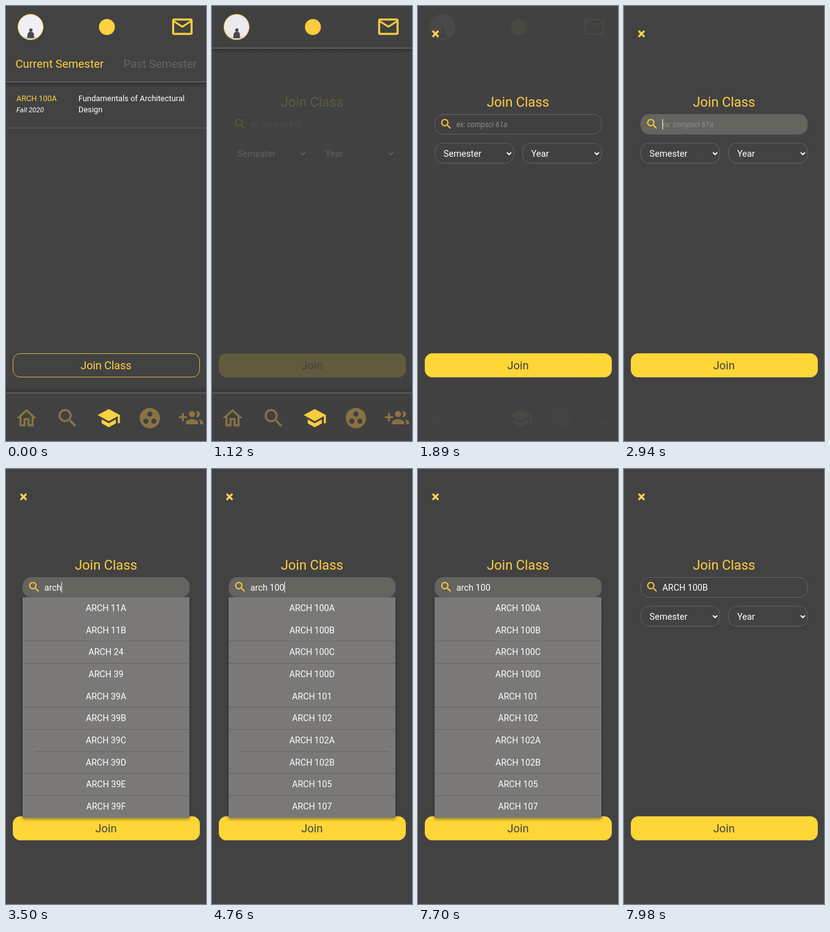
An HTML page for the animation above (8 s loop, 326 px wide and 704 px high).

```html
<!DOCTYPE html>
<html lang="en">
<head>
<meta charset="utf-8">
<title>Join Class</title>
<style>
  html, body { margin: 0; width: 100%; height: 100%; overflow: hidden; background: #424242; }
  svg { display: block; width: 100vw; height: 100vh; }
  text { font-family: Roboto, "Open Sans", sans-serif; fill: #fff; white-space: pre; }
  .gold { fill: #ffd03f; }
  .button { fill: #fed636; }
  .dim { fill: #8a7444; }
  .mid { text-anchor: middle; }
  .it { font-style: italic; }
  .bg { fill: #424242; }
  .box { fill: none; stroke: #636363; }
</style>
</head>
<body>
<svg viewBox="0 0 326 704">
  <defs>
    <linearGradient id="down" x1="0" y1="0" x2="0" y2="1">
      <stop offset="0" stop-opacity=".22"/><stop offset="1" stop-opacity="0"/>
    </linearGradient>
    <linearGradient id="up" x1="0" y1="1" x2="0" y2="0">
      <stop offset="0" stop-opacity=".18"/><stop offset="1" stop-opacity="0"/>
    </linearGradient>
    <filter id="shadow" x="-10%" y="-10%" width="120%" height="120%">
      <feDropShadow dx="0" dy="2" stdDeviation="2.5" flood-opacity=".45"/>
    </filter>
    <clipPath id="face"><circle cx="40" cy="34" r="20"/></clipPath>
  </defs>
  <rect class="bg" width="326" height="704"/>

  <g id="header">
    <circle cx="40" cy="34" r="20.5" fill="#f1eff3" stroke="#ffd03f"/>
    <g clip-path="url(#face)">
      <ellipse cx="40" cy="55" rx="17" ry="6" fill="#cfccd1"/>
      <circle cx="40.5" cy="39" r="2.8" fill="#4b484c"/>
      <path d="M35 52V46Q36 41.500 40.500 41.500T45.500 46V52z" fill="#4b484c"/>
    </g>
    <circle class="gold" cx="164.500" cy="34" r="13"/>
    <rect y="67.500" width="326" height="1.500" fill="#696969"/>
    <rect y="69" width="326" height="8" fill="url(#down)"/>
  </g>

  <g id="nav">
    <rect y="614" width="326" height="12" fill="url(#up)"/>
    <rect y="626" width="326" height="78" fill="#414141"/>
    <rect y="625.500" width="326" height="1.500" fill="#6b6b6b"/>
  </g>

  <g id="classes">
    <rect class="bg" y="67" width="326" height="547"/>
    <text class="gold" x="15.500" y="100" font-size="18.500">Current Semester</text>
    <text x="191.500" y="100" font-size="18.400" style="fill:#666">Past Semester</text>
    <rect y="122" width="326" height="1.500" fill="#696969"/>
    <rect y="123.500" width="326" height="9" fill="url(#down)"/>
    <text class="gold" x="17" y="153.500" font-size="12.600">ARCH 100A</text>
    <text class="it" x="17" y="171.500" font-size="11.300">Fall 2020</text>
    <text x="118" y="153.500" font-size="12.900">Fundamentals of Architectural</text>
    <text x="118" y="171.800" font-size="12.900">Design</text>
    <rect y="197" width="326" height="1" fill="#606060"/>
    <rect id="hover" class="button" x="11" y="562" width="305" height="39" rx="12"/>
    <rect x="11.500" y="562.500" width="304" height="38" rx="11.500" fill="none" stroke="#d9b040"/>
    <text id="openLabel" class="mid" x="163" y="588.300" font-size="17.900">Join Class</text>
  </g>

  <rect id="backdrop" class="bg" width="326" height="704"/>
  <g id="modal">
    <path d="M24.700 41.200l7.600 7.600m0-7.600l-7.600 7.600" stroke="#ffd450" stroke-width="3.200" stroke-linecap="round"/>
    <text class="gold mid" x="163" y="163" font-size="21.900">Join Class</text>
    <rect class="box" x="27.500" y="175.500" width="271.500" height="32" rx="13"/>
    <rect id="focus" x="28" y="176" width="270.500" height="31" rx="12.500" fill="#65645f"/>
    <text id="hint" class="it" x="62.500" y="196.300" font-size="11.800" style="fill:#8d8d8d">ex: compsci 61a</text>
    <text id="query" x="62.500" y="196.500" font-size="14.300"></text>
    <rect id="caret" y="183" width="1" height="17" fill="#fff"/>
    <g id="selects"></g>
    <rect class="button" x="11.500" y="562.500" width="304" height="38" rx="11.500" stroke="#edc94a"/>
    <text class="mid" x="163" y="588.300" font-size="18.200" style="fill:#424242">Join</text>
    <g id="dropdown">
      <rect x="27" y="207.500" width="272" height="357" fill="#7a7977" filter="url(#shadow)"/>
    </g>
  </g>
</svg>
<script>
const LOOP = 8000;
const $ = id => document.getElementById(id);

function add(parent, tag, attrs, text = "") {
  const node = document.createElementNS("http://www.w3.org/2000/svg", tag);
  for (const key in attrs) node.setAttribute(key, attrs[key]);
  node.textContent = text;
  parent.append(node);
  return node;
}

const ICONS = {
  home: "M12 5.69l5 4.5V18h-2v-6H9v6H7v-7.810l5-4.500M12 3L2 12h3v8h6v-6h2v6h6v-8h3L12 3z",
  search: "M15.500 14h-.79l-.28-.27a6.500 6.500 0 1 0-.7.7l.27.28v.79l5 4.990L20.490 19zM9.500 14a4.500 4.500 0 1 1 0-9 4.500 4.500 0 0 1 0 9z",
  school: "M5 13.180v4L12 21l7-3.820v-4L12 17zM12 3L1 9l11 6 9-4.910V17h2V9z",
  groups: "M12 2a10 10 0 1 0 0 20 10 10 0 0 0 0-20zM8 12.500a2.500 2.500 0 1 1 0 5 2.500 2.500 0 0 1 0-5zM12 5.500a2.500 2.500 0 1 1 0 5 2.500 2.500 0 0 1 0-5zM16 12.500a2.500 2.500 0 1 1 0 5 2.500 2.500 0 0 1 0-5z",
  invite: "M8 10H5V7H3v3H0v2h3v3h2v-3h3zM18 11a3 3 0 1 0-.91-5.860 5 5 0 0 1 0 5.720q.4.140.91.140zM13 11a3 3 0 1 0 0-6 3 3 0 0 0 0 6zM19.620 13.160q1.380 1.200 1.380 2.840v2h3v-2c0-1.540-2.370-2.490-4.380-2.840zM13 13c-2 0-6 1-6 3v2h12v-2c0-2-4-3-6-3z",
  mail: "M20 4H4a2 2 0 0 0-2 2v12a2 2 0 0 0 2 2h16a2 2 0 0 0 2-2V6a2 2 0 0 0-2-2zM20 18H4V8l8 5 8-5zM12 11L4 6h16z"
};

function icon(parent, name, cx, cy, size, cls) {
  add(parent, "path", {
    d: ICONS[name], class: cls, "fill-rule": "evenodd",
    transform: `translate(${cx - size / 2} ${cy - size / 2}) scale(${size / 24})`
  });
}

icon($("header"), "mail", 287.5, 33.5, 40, "gold");
["home", "search", "school", "groups", "invite"].forEach((name, i) =>
  icon($("nav"), name, 33.5 + 67 * i, 667, 39.5, name === "school" ? "gold" : "dim"));
icon($("modal"), "search", 46, 191, 22, "gold");
$("modal").append($("dropdown"));

for (const [x, label] of [[27.5, "Semester"], [170.5, "Year"]]) {
  const group = $("selects");
  add(group, "rect", { class: "box", x, y: 222, width: 128.5, height: 32.5, rx: 13 });
  add(group, "text", { x: x + 14, y: 243.8, "font-size": 14.6 }, label);
  add(group, "path", {
    d: `M${x + 117.5} 237l3.500 3.500 3.500-3.500`,
    fill: "none", stroke: "#fff", "stroke-width": 1.8
  });
}

const SUBJECT_LIST = ["11A", "11B", "24", "39", "39A", "39B", "39C", "39D", "39E", "39F"];
const NUMBER_LIST = ["100A", "100B", "100C", "100D", "101", "102", "102A", "102B", "105", "107"];
const PITCH = 35.65;
const rows = SUBJECT_LIST.map((_, i) =>
  add($("dropdown"), "text", { class: "mid", x: 163, y: 230 + PITCH * i, "font-size": 14.2 }));
for (const i of [2, 3, 5, 6, 8, 9])
  add($("dropdown"), "rect", { x: 27, y: Math.round(207 + PITCH * i), width: 272, height: 1, fill: "#656462" });
const shortLine = add($("dropdown"), "rect", { x: 48, y: 457, width: 240, height: 1, fill: "#656462" });

const FOCUS = 2520, PICK = 7770, BLINK = 530;
const KEYS = [
  [0, ""], [3080, "a"], [3220, "ar"], [3360, "arc"], [3500, "arch"],
  [3780, "arch "], [4130, "arch 1"], [4340, "arch 10"], [4620, "arch 100"], [PICK, "ARCH 100B"]
];

const ramp = (t, from, to) => Math.min(1, Math.max(0, (t - from) / (to - from)));
const smooth = p => p * p * (3 - 2 * p);
const show = (node, on) => node.setAttribute("visibility", on ? "inherit" : "hidden");
const fade = (node, opacity) => {
  node.setAttribute("opacity", opacity);
  show(node, opacity > 0);
};

function render(t) {
  const hover = smooth(ramp(t, 70, 350));
  fade($("hover"), hover);
  const blend = (a, b) => Math.round(a + (b - a) * hover);
  $("openLabel").style.fill = `rgb(${blend(255, 66)},${blend(208, 66)},${blend(63, 66)})`;
  fade($("classes"), 1 - smooth(ramp(t, 560, 1000)));
  fade($("backdrop"), ramp(t, 1100, 1930));
  fade($("modal"), ramp(t, 980, 1830));
  fade($("focus"), smooth(ramp(t, 2450, 2700)) * (1 - smooth(ramp(t, PICK, 7910))));

  const [typedAt, value] = KEYS.findLast(([at]) => at <= t);
  const query = $("query");
  if (query.textContent !== value) query.textContent = value;
  show($("hint"), !value);

  const since = t - Math.max(typedAt, FOCUS);
  show($("caret"), t >= FOCUS && t < PICK && Math.floor(since / BLINK) % 2 === 0);
  $("caret").setAttribute("x", 62.5 + (value ? query.getComputedTextLength() : 0));

  const open = value !== "" && t < PICK;
  show($("dropdown"), open);
  show(shortLine, open && t < 7140);
  const list = t < 4130 ? SUBJECT_LIST : NUMBER_LIST;
  rows.forEach((row, i) => {
    const label = "ARCH " + list[i];
    if (row.textContent !== label) row.textContent = label;
  });
}

const start = performance.now();
function tick() {
  render((performance.now() - start) % LOOP);
  requestAnimationFrame(tick);
}
tick();
</script>
</body>
</html>
```
